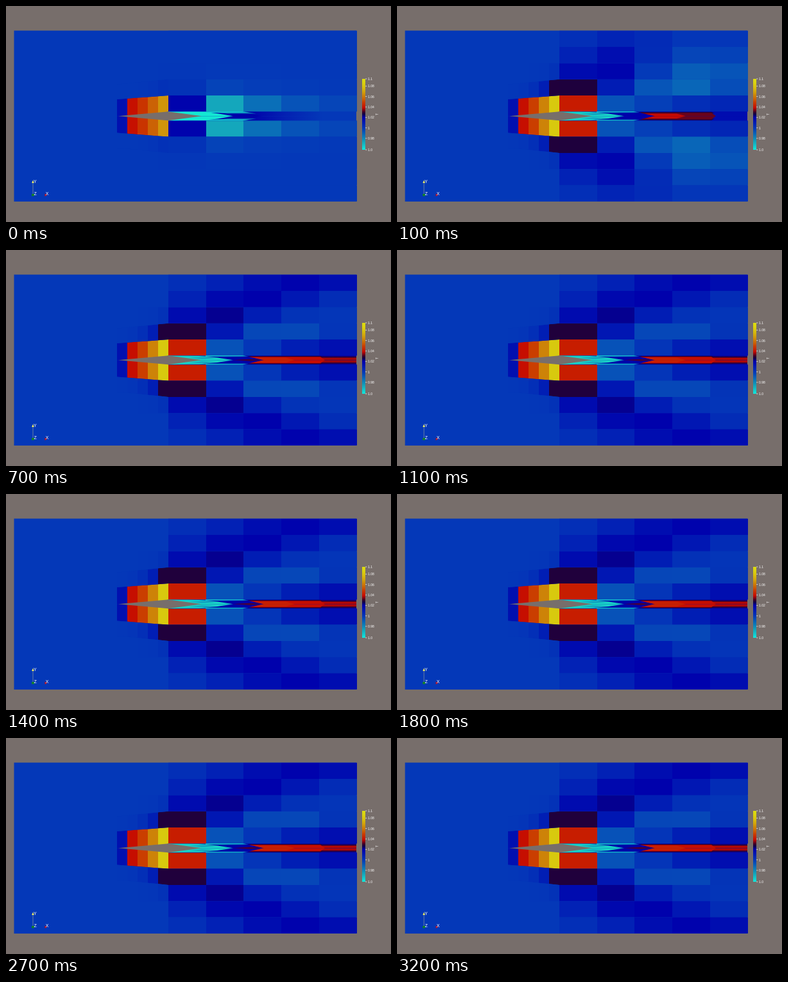
Write an HTML page with a canvas that moves like this. It is 600x338 px and loops after 3.3 s.

```html
<!DOCTYPE html>
<html>
<head>
<meta charset="utf-8">
<style>
html, body { margin: 0; width: 100%; height: 100%; overflow: hidden; background: #776e6b; }
canvas { display: block; }
</style>
</head>
<body>
<canvas id="stage" width="600" height="338"></canvas>
<script>
const ctx = document.getElementById('stage').getContext('2d');
const LOOP = 3300, STEP = 100, MID = 172.3, WAKE = 165.3, GRAY = '#776e6b';
const { exp, max, min, round, sin } = Math;
const lerp = (a, b, p) => a + (b - a) * p;
const bell = (x, width) => exp(-((x / width) ** 2));

// Scalar value (0 to 100) -> colour
const ramp = [
  [0, 16, 236, 222], [18, 20, 163, 186], [28, 12, 124, 184], [45, 4, 56, 184],
  [55, 1, 28, 180], [64, 0, 0, 172], [69, 18, 0, 70], [72, 60, 0, 40],
  [78, 198, 10, 0], [85, 202, 62, 0], [91, 204, 126, 8], [100, 220, 222, 16]
];
function shade(v) {
  let i = 1;
  while (i < ramp.length - 1 && v > ramp[i][0]) i++;
  const a = ramp[i - 1], b = ramp[i], p = (v - a[0]) / (b[0] - a[0]);
  return `rgb(${[1, 2, 3].map(k => round(lerp(a[k], b[k], p)))})`;
}

function poly(fill, ...pts) {
  ctx.fillStyle = fill;
  ctx.beginPath();
  for (let i = 0; i < pts.length; i += 2) ctx.lineTo(pts[i], pts[i + 1]);
  ctx.fill();
}
function rect(fill, x, y, w, h) {
  ctx.fillStyle = fill;
  ctx.fillRect(x, y, w, h);
}
function blend(x0, y0, x1, y1, ...stops) {
  const g = ctx.createLinearGradient(x0, y0, x1, y1);
  stops.forEach(([p, c]) => g.addColorStop(p, c));
  return g;
}
function mirrored(draw) {
  draw();
  ctx.save();
  ctx.translate(0, 2 * MID);
  ctx.scale(1, -1);
  draw();
  ctx.restore();
}
function label(text, x, y, size) {
  ctx.fillStyle = '#fff';
  ctx.font = `${size}px "Liberation Sans", Arial, sans-serif`;
  ctx.fillText(text, x, y);
}

// k counts columns from the thickest point of the wedge, h counts rows outward
const colX = k => round(253 + k * (k < 0 ? 16.1 : 58.7));
function rowY(h, x) {
  if (h < 0) return x < 253 ? MID : WAKE;
  const slant = h === 0 ? .075 : h === 1 ? .1 : 0;
  return 140 - 25.3 * h + max(0, 253 - x) * slant;
}

function upstream(k, h, started) {
  if (h > 0) return 45 + (started ? 25 : 2.5) * exp(k + 1 - 2.5 * (h - 1));
  if (k === -5) return 59;
  return started ? 104.5 + 6.5 * k : 98 + 4.8 * k;
}

function firstPulse(k, h) {
  return 45 + exp(-2.3 * h) * (k ? -28 * exp((1 - k) / 1.4) : 18);
}

// Dark shock ridge fanning outward, a cool trough behind it, then recompression
function downstream(k, h, settle) {
  const reach = 1.7 + 3.5 * settle;
  const front = 1 / (1 + exp(3 * (k - reach)));
  const ridge = (17 + 22 * exp(-h)) * bell(k - .19 * h * h, .55 + .4 * h);
  const trough = 9 * bell(k - 1 - 1.5 * h, 1.2) * exp(-(h ** 4) / 4);
  const rise = 4.5 * max(0, k - 1) * exp(-2 * h) * lerp(.5, 1, settle);
  const passing = 11 * (1 - settle) * bell(k - 3.3, 1.3) * bell(h - 1.8, 1.3);
  return 46 + ridge * front - trough + rise - passing;
}

function drawCells(started, settle) {
  for (let h = 0; h < 5; h++) for (let k = -5; k < 5; k++) {
    if (k < 0 && h > 2) continue;
    const a = colX(k), b = colX(k + 1);
    const v = k < 0 ? upstream(k, h, started)
      : started ? downstream(k, h, settle) : firstPulse(k, h);
    poly(shade(v), a, rowY(h, a), b, rowY(h, b), b, rowY(h - 1, b), a, rowY(h - 1, a));
  }
}

function quietWake() {
  rect(blend(253, 0, 547, 0, [0, '#0000aa'], [.42, '#0000aa'], [.62, '#0420b2'], [.82, shade(45)]),
    253, WAKE, 293, MID - WAKE);
  poly('#0a6cb8', 311, WAKE, 372, WAKE, 390, 168.5, 345, 168.5);
  poly('#16d8d4', 253, WAKE, 368, WAKE, 379, 166.8, 311, 167);
  poly('#14e6d2', 253, WAKE, 311, 166, 330, 168.2, 354, MID, 253, MID);
  poly('#0000a8', 352, MID, 374, 169.6, 400, MID);
}

function hotWake(settle) {
  const tail = lerp(60, 77.5, settle);
  rect('#0000aa', 253, WAKE, 293, MID - WAKE);
  rect(blend(0, WAKE, 0, MID, [0, shade(min(tail, 63))], [.35, shade(min(tail, 71))],
    [.6, shade(tail)], [1, shade(tail - settle)]), 490, WAKE, 56, MID - WAKE);
  poly('#300030', 376, 166, 490, 165.8, 495, 168, 388, 168.2);
  poly(shade(lerp(74, 78.5, settle)), 379, 167.3, 490, 167.3, 497, MID, 402, MID);
  poly(shade(lerp(78, 81, settle)), 386, 168.6, 436, 168.6, 450, MID, 402, MID);
  poly(shade(lerp(64, 73, settle)), 352, MID, 380, 170.8, 402, MID);
  poly('#0a78bc', 253, WAKE, 370, WAKE, 378, 166.8, 311, 166.8);
  poly('#18d2c6', 253, WAKE, 300, 166, 330, 168.6, 354, MID, 253, MID);
  poly('#1096be', 285, 168.4, 312, 168, 328, 169.4, 305, 170.2);
  poly('#16dcd4', 311, WAKE, 368, WAKE, 374, 166.1, 311, 166.4);
}

function drawLegend() {
  const top = 114, height = 111;
  for (let y = 0; y < height; y++) rect(shade(100 * sin(1.5 * (1 - y / height))), 555, top + y, 5, 1);
  const mark = (text, y) => {
    rect('#ddd', 560, y - .4, 2.5, .8);
    label(text, 564, y + 1.9, 5);
  };
  mark('1.1', top);
  for (let i = 0; i < 6; i++) mark(String(+(1.08 - .02 * i).toFixed(2)), 125.3 + 16.35 * i);
  mark('1.0', top + height);
  ctx.save();
  ctx.translate(579.5, 171);
  ctx.rotate(-Math.PI / 2);
  label('T', 0, 0, 5);
  ctx.restore();
}

function drawAxes() {
  rect('#7f8f9c', 41.6, 277, .8, 18);
  poly('#f4f060', 42, 272.5, 43.8, 277, 40.2, 277);
  rect('#10802c', 40, 294, 4, 3.5);
  poly('#c01020', 60.5, 293.5, 64.5, 295.8, 60.5, 298);
  label('Y', 43, 277, 7);
  label('Z', 43.5, 295.8, 7);
  label('X', 61.8, 296.2, 7);
}

function draw(time) {
  const t = Math.floor(time % LOOP / STEP) * STEP;
  const started = t >= STEP, settle = 1 - exp(-max(0, t - STEP) / 200);
  rect(GRAY, 0, 0, 600, 338);
  rect(shade(45), 12.5, 38.5, 533.5, 267.5);
  mirrored(() => {
    drawCells(started, settle);
    if (started) hotWake(settle);
    else quietWake();
  });
  poly(GRAY, 175, MID, 253, WAKE, 305, MID, 253, 2 * MID - WAKE);
  drawLegend();
  drawAxes();
}

function tick(now) {
  draw(now);
  requestAnimationFrame(tick);
}
draw(0);
requestAnimationFrame(tick);
</script>
</body>
</html>
```
